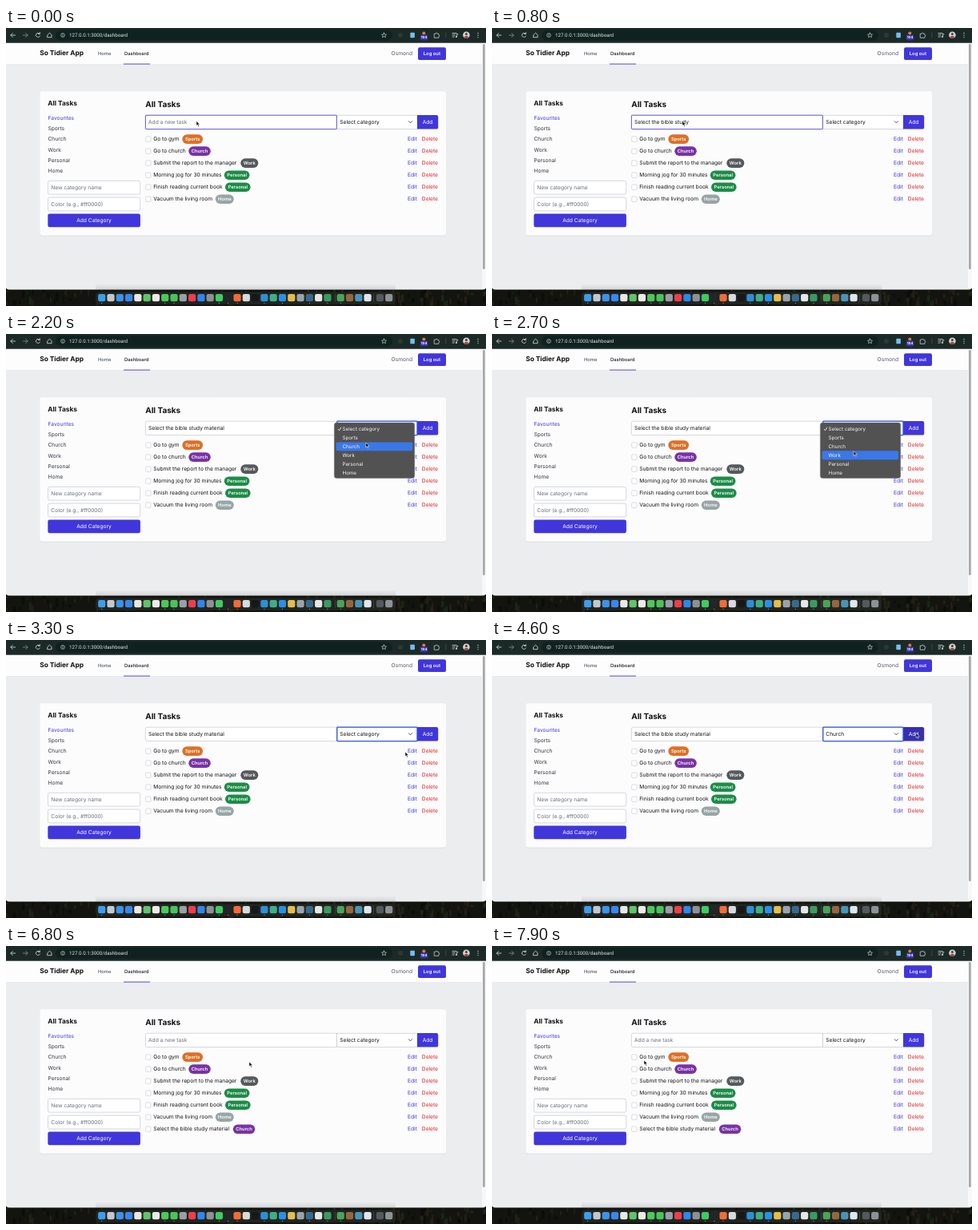
These frames come from a looping animation (600 by 348 pixels, 8000 ms). An HTML page:

```html
<!DOCTYPE html>
<html lang="en">
<head>
<meta charset="utf-8">
<title>Task dashboard</title>
<style>
html, body { margin: 0; height: 100%; overflow: hidden; background: #ebedef; }
svg { display: block; width: 100vw; height: 100vh; font-family: Inter, sans-serif; }
text { dominant-baseline: central; white-space: pre; text-rendering: geometricPrecision; }
</style>
</head>
<body>
<svg id="stage" viewBox="0 0 600 348">
  <defs>
    <linearGradient id="shade" x2="0" y2="1">
      <stop offset="0" stop-color="#000" stop-opacity="0"/><stop offset="1" stop-color="#000" stop-opacity=".1"/>
    </linearGradient>
  </defs>
  <g id="base"></g>
  <g id="live"></g>
</svg>
<script>
const LOOP = 8000, STEP = 100;
const INDIGO = '#4036dc', INK = '#101114', LINE = '#c3c7ce', FOCUS = '#2f55d8', HINT = '#666d79';
const TASK = 'Select the bible study material';
const base = document.getElementById('base'), live = document.getElementById('live');

const rect = (x, y, w, h, fill, r = 0, more = '') =>
  `<rect x="${x}" y="${y}" width="${w}" height="${h}" fill="${fill}" rx="${r}" ${more}/>`;
const text = (x, y, s, fill = INK, size = 6.67, weight = 400, more = '') =>
  `<text x="${x}" y="${y}" fill="${fill}" font-size="${size}" font-weight="${weight}" ${more}>${s}</text>`;
const centered = 'text-anchor="middle"';
const path = (d, stroke, width = .9, more = '') =>
  `<path d="${d}" fill="none" stroke="${stroke}" stroke-width="${width}" stroke-linecap="round" stroke-linejoin="round" ${more}/>`;
const dot = (x, y, r, fill, more = '') => `<circle cx="${x}" cy="${y}" r="${r}" fill="${fill}" ${more}/>`;
const field = (x, y, w, h, r = 2) => rect(x, y, w, h, '#fff', r, `stroke="${LINE}" stroke-width=".7"`);
const ring = (x, y, w, h, color, width) =>
  rect(x, y, w, h, 'none', .8, `stroke="${color}" stroke-width="${width}"`);

function browserBar() {
  const ui = '#c6cfcb';
  return rect(0, 0, 600, 18.7, '#1c2a27') + rect(62, 2.3, 421, 13.4, '#10221f', 6.7) +
    path('M11.5 9H6M8.3 6.5L5.8 9L8.3 11.5', ui) +
    path('M21.5 9H27M24.7 6.5L27.2 9L24.7 11.5', '#7d8985') +
    path('M42 7.2A2.6 2.6 0 1 0 42.4 10M42.3 5.6V7.5H40.4', ui) +
    path('M52 8.6L54.5 6.2L57 8.6V11.7H52Z', ui) +
    dot(71, 9, 2.4, 'none', `stroke="${ui}" stroke-width=".7"`) + path('M71 8.8V10.2M71 7.7V7.8', ui, .7) +
    text(79, 9, '127.0.0.1:3000/dashboard', '#dfe5e2', 6.2, 400, 'font-family="Roboto, sans-serif"') +
    path('M472.5 6L473.4 8L475.5 8.2L473.9 9.6L474.4 11.7L472.5 10.6L470.6 11.7L471.1 9.6L469.5 8.2L471.6 8Z', ui, .7) +
    dot(493, 9, 3, '#2b3a35') + rect(505.3, 5.7, 5.6, 6.6, '#74bdf2', .8) +
    dot(522.3, 6.6, 2, '#df7a3a') + rect(517.8, 8.6, 9.4, 6.6, '#3634a8', 1) +
    text(522.5, 12, '104', '#fff', 4.3, 700, centered) +
    path('M535.6 7.2H537.2A1 1 0 1 1 539.2 7.2H540.8V8.7A1 1 0 1 1 540.8 10.7V12.3H535.6Z', ui, .8) +
    rect(549.6, 5.5, .6, 7, '#53605c') +
    path('M558 6.5H563M558 8.7H561.5M558 11H560.3M563.6 11V7.3L565 7.8', ui) + dot(562.8, 11, 1, ui) +
    dot(575.4, 8.8, 4.3, '#cfd1d4') + dot(575.4, 7.6, 1.5, '#5a3c30') +
    '<path d="M572.4 11.8Q575.4 7.6 578.4 11.8Q575.4 14.4 572.4 11.8Z" fill="#a3423e"/>' +
    [6.4, 9, 11.6].map(y => dot(590, y, .7, ui)).join('');
}

// Dark forest strip with seeded flecks
function wallpaper() {
  let seed = 7, out = rect(0, 326, 600, 22, '#13140f');
  const random = () => (seed = seed * 16807 % 2147483647) / 2147483647;
  for (let i = 0; i < 160; i++) {
    const fill = ['#2b2118', '#1d2a18', '#0a0b08'][i % 3];
    out += rect(random() * 600, 326 + random() * 18, 1 + random() * 3, 3 + random() * 8, fill, 1, 'opacity=".8"');
  }
  return out;
}

function dock() {
  const icons = ('3c9df0 c3c8d0 3b93ea 3987ee e8e8e4 62c36b ecebe9 4cc85c 48c45a 9a9fa6 ee3d4e 2f86ee 8d9197 ' +
    '3ecb64 22262a f26b3a d8dadd 16181b 2d8fd8 3fae87 2b8fe6 e5bd4a 9aa4ac 39688f e4e7e6 3a9a62 ' +
    '4aa35a 96663f 4a93b8 dfe6ee 55585c 8e9296').split(' ');
  const running = [0, 7, 8, 13, 14, 15, 18, 20, 23, 25, 26];
  let out = rect(112, 330.6, 375, 15.4, '#20251f', 4.5);
  icons.forEach((c, i) => {
    const x = 119.7 + i * 11.29 + (i > 25 ? 5 : 0) + (i > 29 ? 4 : 0);
    out += rect(x - 4.6, 333, 9.2, 9.2, '#' + c, 2.2);
    if (running.includes(i)) out += dot(x, 344.3, .5, '#c9cdca');
  });
  for (const x of [411, 459.5]) out += rect(x, 333, .5, 10, '#555a55');
  return out;
}

function row(i, label, tag, x, w, fill) {
  const y = 139.1 + i * 15.03;
  return rect(174.7, y - 3.2, 6.4, 6.4, '#fff', 1.2, `stroke="${LINE}" stroke-width=".6"`) +
    text(184.2, y, label) + rect(x, y - 5.8, w, 11.6, fill, 5.8) +
    text(x + w / 2, y, tag, '#fff', 5.83, 600, centered) +
    text(502, y, 'Edit', INDIGO) + text(540, y, 'Delete', '#dc2626', 6.67, 400, 'text-anchor="end"');
}

function page() {
  const rows = [
    ['Go to gym', 'Sports', 220.3, 25.8, '#de7026'],
    ['Go to church', 'Church', 228.3, 27.5, '#7932a4'],
    ['Submit the report to the manager', 'Work', 293.3, 22, '#55595c'],
    ['Morning jog for 30 minutes', 'Personal', 272.8, 31.6, '#1c8c46'],
    ['Finish reading current book', 'Personal', 274, 31.6, '#1c8c46'],
    ['Vacuum the living room', 'Home', 261.8, 23, '#98a5a6'],
  ];
  const sections = ['Favourites', 'Sports', 'Church', 'Work', 'Personal', 'Home'];
  return wallpaper() +
    '<path d="M0 18H600V323.5Q600 327.5 596 327.5H4Q0 327.5 0 323.5Z" fill="#ebedef"/>' +
    rect(112, 320, 375, 7.5, 'url(#shade)') +
    rect(0, 18, 600, 27.4, '#fdfdfe') + rect(0, 45.4, 595, .5, '#dfe1e5') +
    rect(595, 18, 5, 308, '#f8f8f9') + rect(596, 20, 2.7, 282, '#a6a7aa', 1.3) +
    text(42.2, 32.3, 'So Tidier App', INK, 8.33, 700) +
    text(115, 32.6, 'Home', '#4b5563', 5.83, 500) + text(148, 32.6, 'Dashboard', '#15181f', 5.83, 500) +
    rect(147, 44.6, 33, .9, INDIGO) +
    text(508, 32.2, 'Osmond', '#555c68', 6.67, 400, 'text-anchor="end"') +
    rect(515, 24.3, 35, 15.8, INDIGO, 2.2) + text(532.4, 32.2, 'Log out', '#fff', 5.83, 600, centered) +
    rect(42.3, 80, 507.8, 180.6, '#d9dbdf', 3.2) + rect(42.3, 79.2, 507.8, 180.6, '#fcfcfd', 3.2) +
    text(52.3, 95, 'All Tasks', INK, 8.33, 700) +
    sections.map((s, i) => text(52.5, 112.6 + i * 13.36, s, i ? '#30343c' : INDIGO)).join('') +
    field(52.5, 191.3, 115.2, 16.8) + text(56.3, 199.8, 'New category name', HINT) +
    field(52.5, 212.1, 115.2, 16.8) + text(56.3, 220.6, 'Color (e.g., #ff0000)', HINT) +
    rect(52.3, 232.6, 115.6, 16.6, INDIGO, 2.2) + text(110, 241, 'Add Category', '#fff', 6.67, 400, centered) +
    text(174.2, 95.9, 'All Tasks', INK, 10, 700) +
    field(174.4, 109.2, 239, 17.4) + field(413.4, 109.2, 100.8, 17.4, 0) +
    path('M503.3 116.7L505.4 118.8L507.5 116.7', '#33373d', .9) +
    rows.map((r, i) => row(i, ...r)).join('');
}

// Pointer stops: time, x, y
const stops = [
  [0, 238, 116.5], [1100, 238, 116.5], [1500, 473, 119], [1800, 473, 119], [2300, 447, 138], [2700, 452, 146.5],
  [3000, 519, 143], [3300, 499, 140], [3600, 474, 118.5], [3800, 474, 118.5], [4100, 444, 141], [4200, 444, 141],
  [4500, 530, 116.5], [5000, 530, 116.5], [6000, 402, 150], [6800, 304, 145], [7900, 190, 143], [8000, 190, 143],
];

function pointer(t) {
  const i = stops.findIndex(s => s[0] > t);
  const [t0, x0, y0] = stops[i - 1], [t1, x1, y1] = stops[i];
  const u = (t - t0) / (t1 - t0), e = u * u * (3 - 2 * u);
  return [x0 + (x1 - x0) * e, y0 + (y1 - y0) * e];
}

function menu(y) {
  const items = ['Select category', 'Sports', 'Church', 'Work', 'Personal', 'Home'];
  const pick = Math.round((y - 119) / 10.9);
  return rect(410.3, 111, 100.4, 69.6, '#525253', 3, 'stroke="#77787a" stroke-width=".5"') +
    (items[pick] ? rect(412.6, 113.6 + pick * 10.9, 95.6, 10.9, '#3a78ea', 1.8) : '') +
    path('M415.2 119.2L416.6 120.8L418.7 117.1', '#fff', .8) +
    items.map((s, i) => text(420.5, 119 + i * 10.9, s, '#f6f6f6', 6.25)).join('');
}

const arrow = (x, y) => `<path transform="translate(${x} ${y})" fill="#000" stroke="#fff" stroke-width=".55"
  d="M0 0V5.8L1.3 4.6L2.3 6.9L3.3 6.5L2.3 4.2H4.2Z"/>`;

const between = (t, a, b) => t >= a && t < b;

function draw(t) {
  const [x, y] = pointer(t), added = t >= 4900;
  const typed = added ? '' : TASK.slice(0, Math.max(0, Math.round((t - 100) / 1000 * TASK.length)));
  const category = between(t, 4200, 4900) ? 'Church' : 'Select category';
  const hover = x > 514 && x < 540 && y > 109 && y < 127;
  const open = between(t, 1600, 3000) || between(t, 3700, 4200);
  const click = between(t, 1500, 1700) || between(t, 3600, 3800) || between(t, 4700, 4900);
  let out = text(178, 117.9, typed || 'Add a new task', typed ? INK : HINT) + text(417.3, 117.9, category) +
    `<path d="M514 109H538Q540.2 109 540.2 111.2V124.4Q540.2 126.6 538 126.6H514Z" fill="${hover ? '#372eb2' : INDIGO}"/>` +
    text(527, 117.9, 'Add', '#fff', 6.67, 400, centered);
  if (t < 1500) out += ring(174.4, 109.2, 239, 17.4, '#5a50e6', .9);
  else if (t < 4700) out += ring(413.8, 109.2, 100.2, 17.4, FOCUS, 1.3);
  if (added) out += row(6, TASK, 'Church', 283.8, 27.5, '#7932a4');
  if (open) out += menu(y);
  if (click) out += dot(x, y, 6, 'none', 'stroke="#343a48" stroke-width=".9" opacity=".75"');
  live.innerHTML = out + arrow(x, y);
}

base.innerHTML = page() + browserBar() + dock();
let shown = -1;
function tick() {
  const t = Math.floor(performance.now() % LOOP / STEP) * STEP;
  if (t !== shown) draw(shown = t);
  requestAnimationFrame(tick);
}
tick();
</script>
</body>
</html>
```
